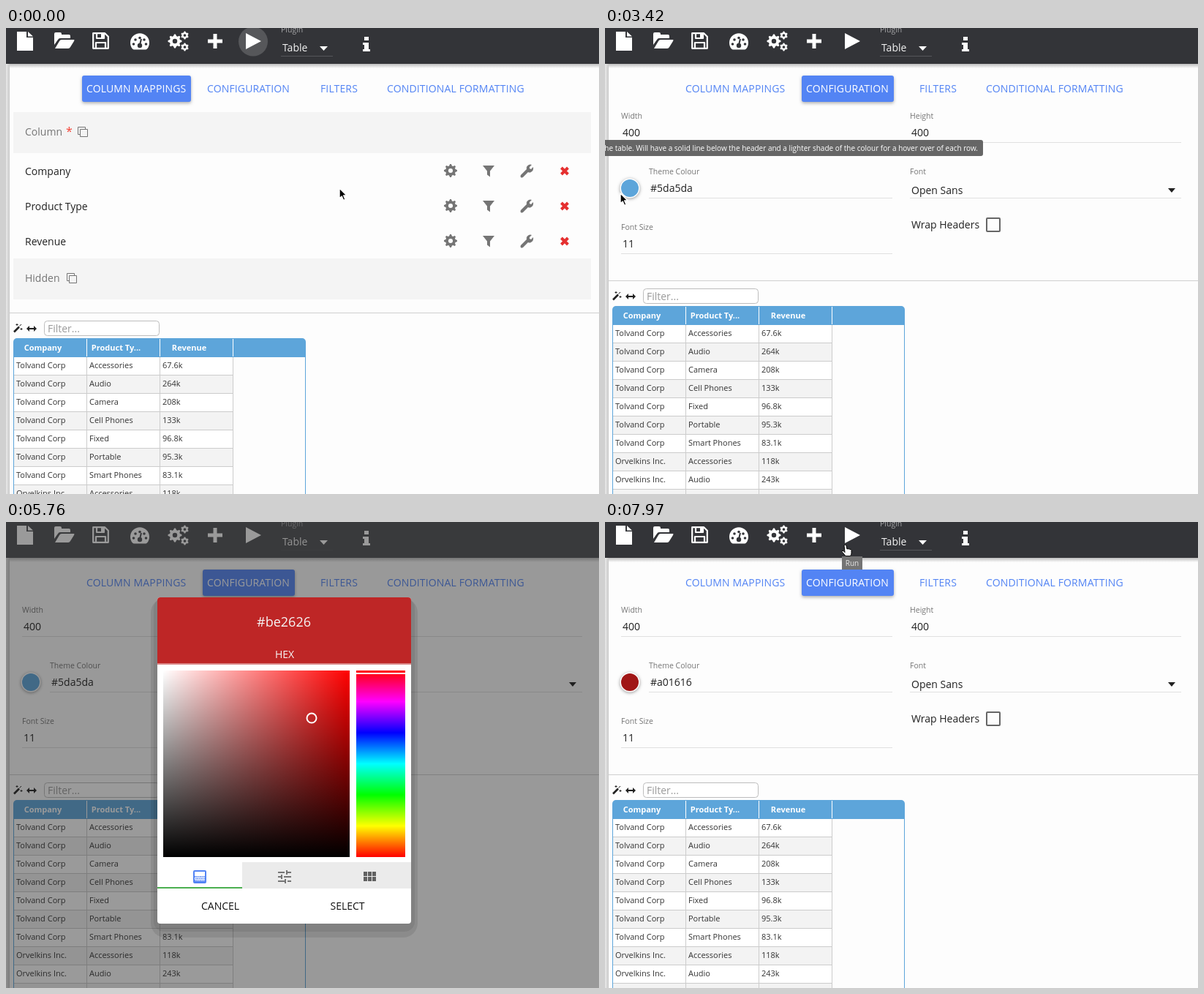
Write an HTML page with a canvas that moves like this. It is 811 px wide and 637 px high and loops after 8000 ms.

```html
<!DOCTYPE html>
<html lang="en">
<head>
<meta charset="utf-8">
<title>Table settings</title>
<style>
html, body { margin: 0; width: 100%; height: 100%; overflow: hidden; background: #fdfdfd; }
canvas { display: block; }
</style>
</head>
<body>
<canvas id="stage" width="811" height="637"></canvas>
<script>
const ctx = document.getElementById('stage').getContext('2d', { alpha: false });
const LOOP = 8000;
const BLUE = '#5da5da', ACCENT = '#5384f4', GREY = '#757575';
const SANS = '"Open Sans", sans-serif';

function text(s, x, y, color = '#212121', size = 14, { align = 'left', weight = 400, spacing = 0 } = {}) {
  ctx.font = `${weight} ${size}px ${SANS}`;
  ctx.textAlign = align;
  ctx.letterSpacing = spacing + 'px';
  ctx.fillStyle = color;
  ctx.fillText(s, x, y);
}
function rect(x, y, w, h, color) {
  ctx.fillStyle = color;
  ctx.fillRect(x, y, w, h);
}
function round(x, y, w, h, r, color, stroke, width = 1) {
  ctx.beginPath();
  ctx.roundRect(x, y, w, h, r);
  if (color) { ctx.fillStyle = color; ctx.fill(); }
  if (stroke) { ctx.strokeStyle = stroke; ctx.lineWidth = width; ctx.stroke(); }
}
function disc(x, y, r, color) {
  ctx.beginPath();
  ctx.arc(x, y, r, 0, 7);
  ctx.fillStyle = color;
  ctx.fill();
}
function shape(d, x, y, fill, stroke, width = 1) {
  const p = new Path2D(d);
  ctx.save();
  ctx.translate(x, y);
  if (fill) { ctx.fillStyle = fill; ctx.fill(p, 'evenodd'); }
  if (stroke) { ctx.strokeStyle = stroke; ctx.lineWidth = width; ctx.stroke(p); }
  ctx.restore();
}
function withShadow(blur, dy, alpha, draw) {
  ctx.save();
  ctx.shadowColor = `rgba(0,0,0,${alpha})`;
  ctx.shadowBlur = blur;
  ctx.shadowOffsetY = dy;
  draw();
  ctx.restore();
}
function gradient(x0, y0, x1, y1, ...colors) {
  const g = ctx.createLinearGradient(x0, y0, x1, y1);
  colors.forEach((c, i) => g.addColorStop(i / (colors.length - 1), c));
  return g;
}
function gear(x, y, r, teeth, color) {
  ctx.beginPath();
  for (let i = 0; i < teeth * 4; i++) {
    const a = (i - 0.5) * Math.PI / (teeth * 2), q = i % 4 < 2 ? r : r * 0.76;
    ctx.lineTo(x + q * Math.sin(a), y - q * Math.cos(a));
  }
  ctx.closePath();
  ctx.moveTo(x + r * 0.34, y);
  ctx.arc(x, y, r * 0.34, 0, 7);
  ctx.fillStyle = color;
  ctx.fill('evenodd');
}

function toolbar(t, dim) {
  const base = 51 + dim * 60, bg = `rgb(${base},${base + 1},${base + 5})`;
  rect(0, 49, 811, 6, gradient(0, 49, 0, 55, '#bdbdbd', '#fdfdfd'));
  rect(0, 49, 5, 588, gradient(0, 0, 5, 0, '#e9e9e9', '#c9c9c9'));
  rect(0, 0, 811, 49, bg);
  if (t < 1180) disc(338, 18.5, 20, '#56575a');
  const w = '#fff';
  shape('M0 0h13v8h9v18H0zM15 0l7 6.5h-7z', 15, 5, w);
  shape('M0 17V2q0-2 2-2h6q2 0 2 2v1h10q2 0 2 2v3H8q-2 0-3 2zM1 22l6-10q1-2 3-2h17q1 0 0 2l-5 8q-1 2-3 2z', 66, 6, w);
  shape('M1.2 1.2h16l4.6 4.6v16H1.2zM6 1v7h10V1M5 22v-8h13v8', 118, 6, null, w, 2.2);
  rect(130, 8, 3, 5, w);
  shape('M3 20A13 13 0 1 1 23 20q-1 1-2 1H5q-1 0-2-1z', 170, 8.5, w);
  for (const [x, y] of [[174.5, 22], [177, 16], [183, 13.5], [189, 16], [191.5, 22]]) disc(x, y, 1.8, bg);
  shape('M13 15l2-8', 170, 8, null, bg, 2);
  disc(183, 24, 3.2, bg);
  gear(231, 18, 9.5, 8, w);
  gear(244.5, 10, 5.5, 6, w);
  gear(244.5, 26, 5.5, 6, w);
  shape('M7.5 0h5v7.5H20v5h-7.5V20h-5v-7.5H0v-5h7.5z', 276, 8, w);
  shape('M0 0L21 11L0 22z', 328, 7, w);
  text('Plugin', 376, 6, '#a5a5a7', 10.5);
  text('Table', 378, 32, '#f2f2f2');
  shape('M0 0h11l-5.5 6z', 429, 25, w);
  rect(376, 38, 71, 1, '#55565a');
  shape('M2 0h6v5H2zM0 8h8v9h2v3H0v-3h2v-6H0z', 488, 12, w);
}

function tab(label, x, width, active, bg) {
  if (active) withShadow(4, 2, 0.3, () => round(x, 65, width, 36, 3, bg));
  else if (bg) round(x, 65, width, 36, 3, bg);
  text(label, x + 6, 88, active ? '#fff' : ACCENT, 14, { spacing: 0.14 });
}
function tabs(t, config) {
  let bg = ACCENT;
  if (!config) bg = t >= 440 ? 'rgba(158,158,158,.2)' : null;
  else if (t < 2380) bg = '#1e88e5';
  tab('COLUMN MAPPINGS', 104, 149, !config, config ? null : ACCENT);
  tab('CONFIGURATION', 269, 126, config, bg);
  tab('FILTERS', 424, 63, false);
  tab('CONDITIONAL FORMATTING', 515, 201, false);
}

function copyIcon(x, y) {
  shape('M.5 .5h10v10H.5zM3.5 3.5h10v10H3.5z', x, y, null, GREY);
  rect(x + 4, y + 4, 9, 9, '#f4f4f4');
}
function mappings() {
  rect(10, 115, 790, 56, '#f4f4f4');
  text('Column', 26, 147, GREY);
  text('*', 82, 147, '#f44336', 16);
  copyIcon(98, 135);
  ['Company', 'Product Type', 'Revenue'].forEach((label, i) => {
    const y = 195 + i * 48;
    text(label, 26, y + 6);
    gear(608, y, 9, 8, GREY);
    shape('M0 0h16l-6 7.5v8l-4-3v-5z', 652, y - 7, GREY);
    shape('M1 14l8-8q-1-4 3-6q2-1 4 0l-3 3v2l2 1l3-3q1 5-3 7q-2 1-4 0l-7 7q-2 1-3 0t0-3z', 703, y - 8, GREY);
    shape('M2 2L11 11M11 2L2 11', 757.5, y - 6, null, '#e53030', 4);
  });
  rect(10, 315, 790, 56, '#f4f4f4');
  text('Hidden', 26, 347, GREY);
  copyIcon(83, 335);
}

function field(label, value, x, y, lineEnd) {
  text(label, x, y, GREY, 10.5);
  text(value, x + 2, y + (label === 'Font' ? 27 : 24));
  rect(x, y + 32, lineEnd - x, 1, '#e0e0e0');
}
function settings(theme) {
  field('Width', '400', 22, 124, 393);
  field('Height', '400', 417, 124, 788);
  field('Theme Colour', theme, 60, 200, 393);
  field('Font', 'Open Sans', 417, 200, 788);
  field('Font Size', '11', 22, 276, 393);
  withShadow(4, 1, 0.4, () => disc(34, 219, 13.5, '#fff'));
  disc(34, 219, 12, theme);
  shape('M0 0h10l-5 6z', 770, 219, '#212121');
  text('Wrap Headers', 419, 274);
  round(522, 260, 18, 18, 1, null, '#666', 2);
}

const PRODUCTS = ['Accessories', 'Audio', 'Camera', 'Cell Phones', 'Fixed', 'Portable', 'Smart Phones'];
const REVENUE = ['67.6k', '264k', '208k', '133k', '96.8k', '95.3k', '83.1k', '118k', '243k', '187k'];
function table(top) {
  rect(5, top, 806, 1, '#cfcfcf');
  shape('M1 11L8 4', 10, top + 15.5, null, '#222', 2.6);
  shape('M8.5 3.5L11 1M5 0v3M3.5 1.5h3M11 6v3M9.5 7.5h3', 10, top + 15, null, '#222');
  shape('M0 4l4-4v3h6V0l4 4l-4 4V5H4v3z', 28, top + 18, '#222');
  round(52.5, top + 11.5, 157, 20, 4, '#fff', '#bdbdbd');
  text('Filter...', 57, top + 27, '#9a9a9a');

  const body = top + 61;
  REVENUE.forEach((value, i) => {
    const y = body + i * 25;
    rect(11, y, 300, 25, i % 2 ? '#f3f3f3' : '#fff');
    rect(11, y + 24, 300, 1, '#cccccc');
    text(i < 7 ? 'Tolvand Corp' : 'Orvelkins Inc.', 14, y + 15, '#333', 11);
    text(PRODUCTS[i % 7], 114, y + 15, '#333', 11);
    text(value, 214, y + 15, '#333', 11);
  });
  round(10, top + 35, 400, 26, [5, 5, 0, 0], BLUE);
  rect(10, body, 1, 300, BLUE);
  rect(409, body, 1, 300, BLUE);
  for (const x of [110, 210, 310]) {
    rect(x, top + 36, 1, 24, '#fff');
    rect(x, body, 1, 300, '#cccccc');
  }
  ['Company', 'Product Ty...', 'Revenue'].forEach((label, i) =>
    text(label, 50.5 + i * 100, top + 52, '#fff', 11, { align: 'center', weight: 700 }));
}

function hsv(h, s, v) {
  return [5, 3, 1].map(n => {
    const k = (n + h / 60) % 6;
    return Math.round(255 * v * (1 - s * Math.max(0, Math.min(k, 4 - k, 1))));
  });
}
const hex = rgb => '#' + rgb.map(c => c.toString(16).padStart(2, '0')).join('');

// Last entry whose time has been reached; the picture holds between entries.
const held = (list, t) => list.filter(e => t >= e[0]).pop();

// time, hue, saturation, value
const PICKS = [
  [0, 205.4, 0.573, 0.855], [4680, 245, 0.566, 0.867], [4860, 287.5, 0.5656, 0.8667],
  [5010, 360, 0.566, 0.867], [5160, 360, 0.58, 0.86], [5310, 360, 0.62, 0.84],
  [5460, 360, 0.67, 0.815], [5610, 360, 0.735, 0.78], [5760, 360, 0.8, 0.745],
  [5910, 360, 0.84, 0.685], [6060, 360, 0.8625, 0.6275]
];

function dialog(t, x, y, w, h) {
  const [, hue, s, v] = held(PICKS, t), opening = t < 4200;
  const rgb = hsv(hue, s, v), color = hex(rgb);
  const dark = 0.299 * rgb[0] + 0.587 * rgb[1] + 0.114 * rgb[2] > 128;
  const ink = dark ? '#2b2b2b' : '#f5f5f5', mid = { align: 'center' };
  ctx.translate(x, y);
  ctx.scale(w / 347, h / 446);
  ctx.translate(-207, -103);
  if (t < 6960) {
    round(198, 104, 365, 464, 20, 'rgba(0,0,0,.09)');
    round(202, 104, 357, 456, 14, 'rgba(0,0,0,.07)');
  }
  round(207, 103, 347, 446, 4, '#fff');
  round(207, 103, 347, 92, [4, 4, 0, 0], color);
  rect(207, 193, 347, 2, hex(rgb.map(c => Math.round(dark ? c * 0.55 : c + (255 - c) * 0.45))));
  if (!opening) text(color, 380, 143, ink, 18, mid);
  text('HEX', 381, 186, ink, 14, mid);

  rect(215, 203, 255, 255, gradient(215, 0, 470, 0, '#fff', hex(hsv(hue, 1, 1))));
  rect(215, 203, 255, 255, gradient(0, 203, 0, 458, 'rgba(0,0,0,0)', '#000'));
  rect(479, 203, 67, 255, gradient(0, 203, 0, 458, '#f00', '#f0f', '#00f', '#0ff', '#0f0', '#ff0', '#f00'));
  const slide = opening ? 203 : 203 + 255 * (1 - hue / 360);
  if (slide > 206) rect(479, slide - 5, 67, 2, '#fff');
  rect(479, slide + 3, 67, 2, '#fff');
  ctx.beginPath();
  if (opening) ctx.arc(467, 206, 6.5, 0, 7);
  else ctx.arc(214 + 255 * s, 203 + 255 * (1 - v), 6.5, 0, 7);
  ctx.strokeStyle = '#fff';
  ctx.lineWidth = 2;
  ctx.stroke();

  rect(323, 465, 231, 36, '#ebebeb');
  rect(207, 499, 116, 2, '#4caf50');
  round(257, 477, 16, 16, 1, null, ACCENT, 2);
  for (let i = 0; i < 18; i++) rect(258 + i % 6 * 2.4 + (i / 6 & 1), 484 + (i / 6 | 0) * 2.6, 1.6, 1.6, ACCENT);
  rect(258, 491, 14, 2, ACCENT);
  shape('M0 2h9M13 2h5M12 -1v6M0 8h4M8 8h10M5 5v6M0 14h9M13 14h5M10 11v6', 372, 477, null, GREY, 2);
  for (let i = 0; i < 6; i++) rect(489 + i % 3 * 6, 478 + (i / 3 | 0) * 7, 5, 6, '#616161');
  if (t >= 6510 && t < 6960) round(431, 507, 72, 36, 2, '#e6e6e6');
  text('CANCEL', 293, 530, '#111', 14, mid);
  text('SELECT', 467, 530, '#111', 14, mid);
}

// time, overlay strength, dialog opacity, dialog box
const LAYERS = [
  [0, 0, 0], [4020, 0.12, 0.45, 136, 106, 230, 361], [4200, 0.45, 1, 207, 103, 347, 446],
  [6960, 0.4, 0.6, 150, 136, 246, 314], [7100, 0.32, 0.25, 91, 169, 145, 180], [7240, 0.08, 0], [7390, 0, 0]
];

// start, end, steps, x, y
const MOVES = [
  [140, 740, 5, 338, 84], [2230, 2230, 1, 308, 187], [2380, 2830, 4, 101, 221],
  [3280, 3420, 2, 21, 226], [4200, 4500, 3, 505, 300], [5010, 5010, 1, 435, 298],
  [6210, 6660, 4, 467, 522], [6960, 7100, 2, 393, 267], [7240, 7240, 1, 385, 238], [7390, 7970, 5, 328, 31]
];
function pointer(t) {
  let x = 456, y = 219;
  for (const [start, end, steps, toX, toY] of MOVES) {
    if (t < start) break;
    const gap = (end - start) / (steps - 1 || 1) || 1;
    const k = Math.min(1, (Math.floor((t - start) / gap + 0.01) + 1) / steps);
    x += (toX - x) * k;
    y += (toY - y) * k;
  }
  if (t >= 4500 && t < 6210) return;
  const hand = t >= 590 && t < 2230 || t >= 6660 && t < 6960 || t >= 7970;
  ctx.lineJoin = 'round';
  if (hand) {
    shape('M0 1q1-2 3 0l1 5q1-1 2 0q1-1 2 .5q2-.5 2 1v4q0 2-1.500 4H2l-5-6q-1-2 2-1l2 2z', x - 1, y, '#fff', '#000');
  } else {
    shape('M0 0v14l3.200-3l2.300 5.500l2.500-1L5.700 10h4.300z', x, y, '#000', '#fff', 1.4);
  }
}

function tips(t) {
  if (t >= 3420 && t < 4200) {
    round(-40, 153, 557, 22, 3, 'rgba(90,90,90,.92)');
    text('The main colour of the table. Will have a solid line below the header and a lighter shade of the colour for a hover over of each row.',
      510, 168, '#fff', 10, { align: 'right' });
  }
  if (t >= 7970) {
    rect(324, 47, 28, 18, '#747474');
    text('Run', 338, 59.5, '#e8e8e8', 10, { align: 'center' });
  }
}

function draw(t) {
  const config = t >= 1180;
  const [, dim, opacity, ...box] = held(LAYERS, t);
  rect(0, 0, 811, 637, '#fdfdfd');
  toolbar(t, dim);
  tabs(t, config);
  if (config) settings(t >= 7240 ? '#a01616' : BLUE);
  else mappings();
  table(config ? 345 : 389);
  if (dim) rect(0, 0, 811, 637, `rgba(33,33,33,${dim})`);
  if (opacity) {
    ctx.save();
    ctx.globalAlpha = opacity;
    dialog(t, ...box);
    ctx.restore();
  }
  tips(t);
  pointer(t);
}

function frame() {
  draw(performance.now() % LOOP);
  requestAnimationFrame(frame);
}
frame();
</script>
</body>
</html>
```
